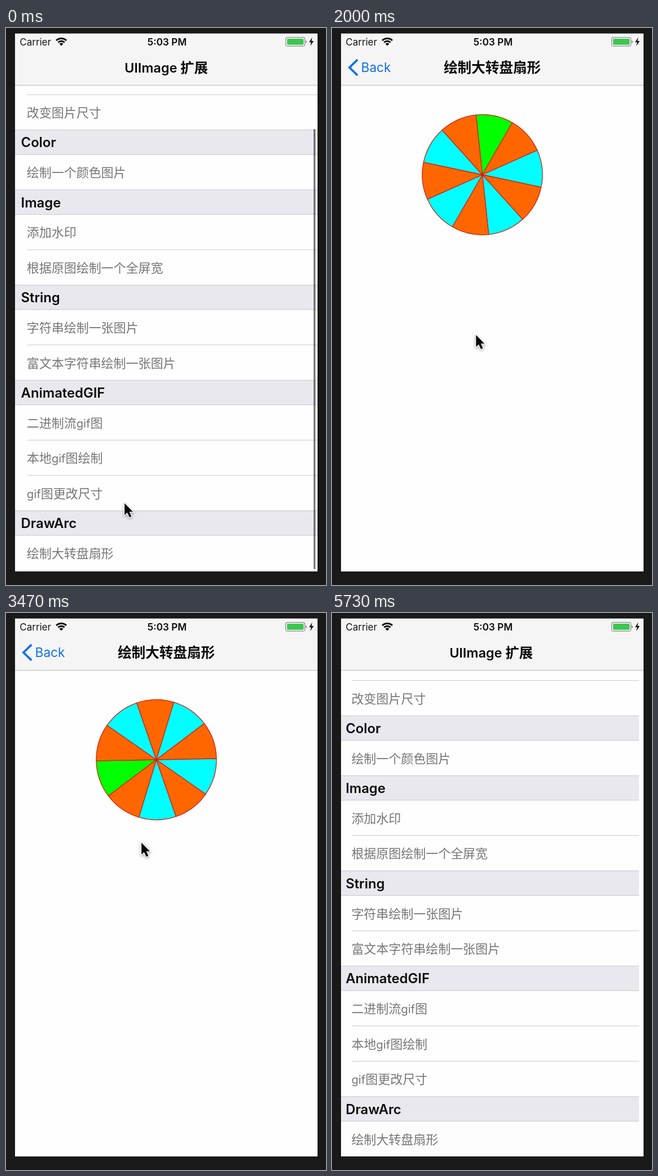
Write an HTML page with a canvas that moves like this. It is 567 by 987 pixels and loops after 5.79 s.

```html
<!DOCTYPE html>
<html lang="zh-CN">
<head>
<meta charset="utf-8">
<title>UIImage 扩展</title>
<style>
html, body { margin: 0; width: 100%; height: 100%; overflow: hidden; background: #191919; }
canvas { display: block; width: 567px; height: 987px; }
</style>
</head>
<body>
<canvas id="stage"></canvas>
<script>
const W = 567, H = 987, LOOP = 5790;
const L = 16, T = 9.5, R = 552, B = 963, SW = R - L, NAV = 101;
const ROW = 62.6, HEAD = 43.5, LIST_TOP = 182.1;
const PUSH = 1184, POP = 5400;
const BLUE = '#1070e6', LINE = '#c8c7cc';
const LATIN = 'Inter, sans-serif';
const HAN = '"Noto Sans CJK SC", "Noto Sans CJK", sans-serif';

const SECTIONS = [
  ['Color', '绘制一个颜色图片'],
  ['Image', '添加水印', '根据原图绘制一个全屏宽'],
  ['String', '字符串绘制一张图片', '富文本字符串绘制一张图片'],
  ['AnimatedGIF', '二进制流gif图', '本地gif图绘制', 'gif图更改尺寸'],
  ['DrawArc', '绘制大转盘扇形']
];

// time, x, y of the pointer tip
const POINTER = [
  [0, 210, 842], [500, 208, 850], [1000, 174, 936], [1200, 173, 938],
  [1350, 175, 915], [1600, 188, 797], [1800, 232, 640], [2050, 261, 520],
  [2400, 257, 438], [2900, 256, 436], [3470, 240, 407], [3900, 247, 400],
  [4270, 248, 399], [4420, 220, 350], [4800, 66, 84], [5000, 58, 72], [5660, 58, 72]
];

const canvas = document.getElementById('stage');
const dpr = window.devicePixelRatio || 1;
canvas.width = W * dpr;
canvas.height = H * dpr;
const c = canvas.getContext('2d');

const clamp = v => Math.max(0, Math.min(1, v));
const spring = ms => {
  const k = Math.max(0, ms) * 0.0187;
  return 1 - (1 + k) * Math.exp(-k);
};

// ease-in-out: cubic-bezier(.42, 0, .58, 1)
function ease(x) {
  x = clamp(x);
  let lo = 0, hi = 1;
  for (let i = 0; i < 24; i++) {
    const s = (lo + hi) / 2, q = 1 - s;
    if (1.26 * s * q * q + 1.74 * s * s * q + s * s * s < x) lo = s; else hi = s;
  }
  return lo * lo * (3 - 2 * lo);
}

function rect(x, y, w, h, color) {
  c.fillStyle = color;
  c.fillRect(x, y, w, h);
}

function text(str, x, y, size, color, weight = 400) {
  c.font = `${weight} ${size}px ${LATIN}`;
  c.fillStyle = color;
  c.fillText(str, x, y);
}

// Latin and Han runs each get their own face and size
function mixed(str, x, y, latinSize, hanSize, color, weight, center) {
  const runs = str.match(/[\x00-\x7f]+|[^\x00-\x7f]+/g).map(s => {
    const font = s.charCodeAt(0) < 128
      ? `${weight} ${latinSize}px ${LATIN}`
      : `${weight > 400 ? 700 : 400} ${hanSize}px ${HAN}`;
    c.font = font;
    return { s, font, w: c.measureText(s).width };
  });
  if (center) x -= runs.reduce((sum, r) => sum + r.w, 0) / 2;
  c.fillStyle = color;
  for (const r of runs) {
    c.font = r.font;
    c.fillText(r.s, x, y);
    x += r.w;
  }
}

function cell(label, y) {
  mixed(label, 36.8, y + ROW / 2 + 8.8, 20.3, 21.97, '#767676', 400);
}

function drawList(dx, dy, picked) {
  c.save();
  c.translate(dx, dy);
  rect(L, NAV, SW, B - NAV + 10, '#fefefe');
  let y = LIST_TOP - ROW;
  rect(37.5, y - 0.5, R - 37.5, 1, LINE);
  cell('改变图片尺寸', y);
  y += ROW;
  SECTIONS.forEach(([name, ...items], i) => {
    rect(L, y, SW, HEAD, '#eae8ef');
    rect(L, y - 0.5, SW, 1, LINE);
    rect(L, y + HEAD - 0.5, SW, 1, LINE);
    text(name, 26.6, y + HEAD / 2 + 9, 23.8, '#0c0c0c', 600);
    y += HEAD;
    items.forEach((item, j) => {
      if (i === SECTIONS.length - 1 && picked > 0) {
        rect(L, y, SW, ROW, `rgba(200,200,200,${picked})`);
      }
      if (j) rect(37.5, y - 0.5, R - 37.5, 1, LINE);
      cell(item, y);
      y += ROW;
    });
  });
  rect(L, y - 0.5, SW, 1, LINE);
  c.restore();
}

function drawWheel(cx, cy, turn) {
  const r = 106.5, step = Math.PI / 5;
  c.strokeStyle = '#cc2210';
  c.lineWidth = 1.3;
  c.lineJoin = 'round';
  for (let i = 0; i < 10; i++) {
    const a = turn + (i - 1) * step;
    c.beginPath();
    c.moveTo(cx, cy);
    c.arc(cx, cy, r, a, a + step);
    c.closePath();
    c.fillStyle = i === 0 ? '#00ff00' : i % 2 ? '#ff6600' : '#00ffff';
    c.fill();
    c.stroke();
  }
}

function drawDetail(x, shade, turn) {
  if (shade > 0) {
    const g = c.createLinearGradient(x - 9, 0, x, 0);
    g.addColorStop(0, 'rgba(0,0,0,0)');
    g.addColorStop(0.5, `rgba(0,0,0,${0.12 * shade})`);
    g.addColorStop(1, `rgba(0,0,0,${0.12 * shade})`);
    rect(x - 9, NAV, 9, B - NAV, g);
  }
  rect(x, NAV, SW, B - NAV, '#fefefe');
  drawWheel(x + 250.4, 260, turn);
}

function drawStatus() {
  text('Carrier', 24.3, 30.5, 17, '#161616');
  text('5:03 PM', 250.5, 30.5, 17.2, '#0c0c0c', 600);

  const up = -Math.PI / 2, half = 0.76;
  c.strokeStyle = c.fillStyle = '#0c0c0c';
  c.lineWidth = 3;
  for (const r of [13, 8.3]) {
    c.beginPath();
    c.arc(98, 31.5, r, up - half, up + half);
    c.stroke();
  }
  c.beginPath();
  c.moveTo(98, 31.5);
  c.arc(98, 31.5, 5, up - half, up + half);
  c.fill();

  c.strokeStyle = '#8a8a8a';
  c.lineWidth = 1.2;
  c.beginPath();
  c.roundRect(495.6, 16.6, 34, 15.6, 3.5);
  c.stroke();
  c.fillStyle = '#3cc651';
  c.beginPath();
  c.roundRect(498, 19, 29.4, 10.8, 1.8);
  c.fill();
  c.fillStyle = '#8a8a8a';
  c.beginPath();
  c.arc(530.8, 24.4, 2.2, up, -up);
  c.fill();
  shape([[542.6, 16.5], [537, 25.2], [540.6, 25.2], [539.2, 32], [545.2, 22.9], [541.4, 22.9]], '#111');
}

function shape(points, color) {
  c.beginPath();
  points.forEach(([x, y]) => c.lineTo(x, y));
  c.closePath();
  c.fillStyle = color;
  c.fill();
}

// p: 0 shows the list bar, 1 the detail bar
function drawNav(p, pressed) {
  rect(L, T, SW, NAV - T, '#f5f5f5');
  rect(L, NAV, SW, 1, '#b9b9bb');
  drawStatus();
  if (p < 0.995) {
    c.globalAlpha = clamp(1.05 - p * 1.3);
    mixed('UIImage 扩展', 284 - 130 * p, 78.6, 23.4, 24.4, '#0c0c0c', 600, true);
  }
  const shown = clamp(p * 1.25 - 0.25);
  if (shown > 0) {
    c.globalAlpha = shown;
    mixed('绘制大转盘扇形', 284 + 350 * (1 - p), 78.6, 23.4, 24.6, '#0c0c0c', 600, true);
    c.globalAlpha = shown * (pressed ? 0.3 : 1);
    c.strokeStyle = BLUE;
    c.lineWidth = 3.8;
    c.lineJoin = 'miter';
    c.beginPath();
    c.moveTo(45.2, 56.2);
    c.lineTo(31, 70);
    c.lineTo(45.2, 83.8);
    c.stroke();
    text('Back', 51.6 + 130 * (1 - p), 78.4, 22.6, BLUE);
  }
  c.globalAlpha = 1;
}

function drawPointer(t) {
  const i = POINTER.findIndex(k => k[0] > t);
  if (i < 0) return;
  const [t0, x0, y0] = POINTER[i - 1], [t1, x1, y1] = POINTER[i];
  const k = (t - t0) / (t1 - t0);
  c.save();
  c.translate(x0 + (x1 - x0) * k, y0 + (y1 - y0) * k);
  c.beginPath();
  [[0, 0], [0, 21], [4.8, 16.7], [8.6, 25], [12.2, 23.4], [8.7, 15.3], [15, 15.3]]
    .forEach(([x, y]) => c.lineTo(x, y));
  c.closePath();
  c.shadowColor = 'rgba(0,0,0,.4)';
  c.shadowBlur = 4 * dpr;
  c.shadowOffsetY = 1.5 * dpr;
  c.strokeStyle = '#fff';
  c.lineWidth = 2.6;
  c.lineJoin = 'miter';
  c.stroke();
  c.shadowColor = 'transparent';
  c.fillStyle = '#060606';
  c.fill();
  c.restore();
}

function draw(t) {
  const popping = t >= POP;
  const p = popping ? 1 - spring(t - POP) : spring(t - PUSH);
  const settle = t < 2000 ? -1.4 * Math.exp(-t / 140) : 0;
  const picked = popping ? p : t >= 1060 ? 1 : 0;
  const spinStart = 1134 + 33 * Math.max(0, (2400 - t) / 800);
  const turn = 10 * Math.PI * ease((t - spinStart) / 3000);

  c.setTransform(dpr, 0, 0, dpr, 0, 0);
  rect(0, 0, W, H, '#191919');
  c.save();
  c.beginPath();
  c.rect(L, T, SW, B - T);
  c.clip();
  if (p < 0.9995) {
    drawList(-0.3 * SW * p, settle, picked);
    rect(L, NAV, SW, B - NAV, `rgba(0,0,0,${0.1 * p})`);
  }
  if (p > 0) drawDetail(L + SW * (1 - p), popping ? p : 1, turn);

  const bar = 1 - clamp((t - 250) / 300);
  if (bar > 0) {
    c.fillStyle = `rgba(0,0,0,${0.52 * bar})`;
    c.beginPath();
    c.roundRect(545, 179, 3.2, 780, 1.6);
    c.fill();
  }
  drawNav(p, t >= 5300 && !popping);
  c.restore();
  drawPointer(t);
}

function tick(now) {
  const t = now % LOOP;
  draw(Math.round(Math.floor(t * 0.015 + 0.051) * 20 / 3) * 10);
  requestAnimationFrame(tick);
}
draw(0);
requestAnimationFrame(tick);
</script>
</body>
</html>
```
